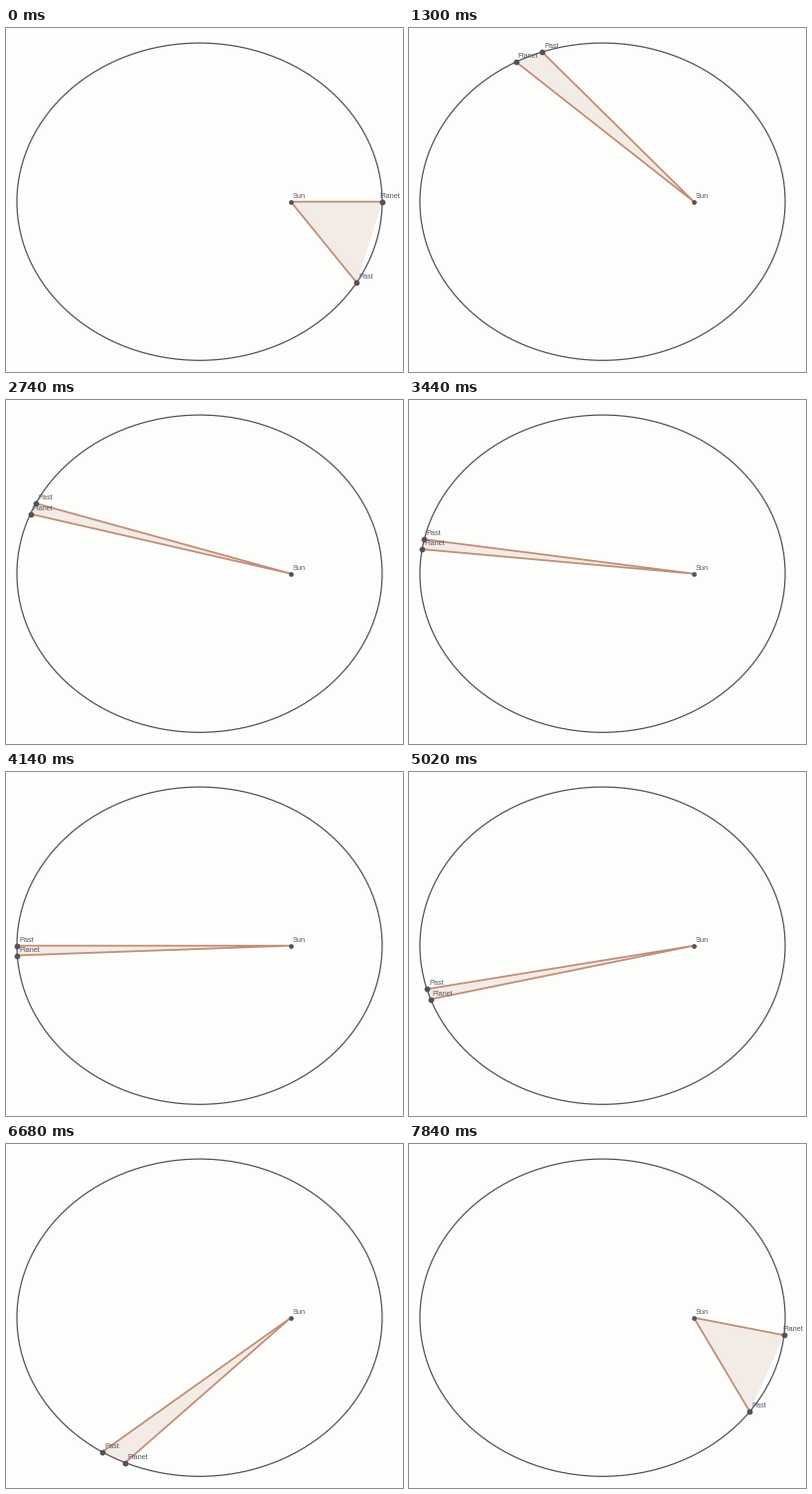
Recreate the animation shown at these times as a matplotlib script. Size 400 px wide and 346 px high, loop 7.86 s.

```python
import numpy as np
import matplotlib.pyplot as plt
from matplotlib.animation import FuncAnimation
from matplotlib.patches import Ellipse, Polygon

W, H, DPI = 400, 346, 100
FRAMES, INTERVAL = 393, 20
PERIOD, LAG = 394, 10            # orbital period and trailing delay, in steps
CX, CY, A, B, ECC = 195, 174.7, 184, 159.6, 0.5
SUN = (CX + A * ECC, CY)
PAPER, INK, TEXT = "#fdfefc", "#55515a", "#585662"
EDGE, FILL = "#c08f79", "#f3ebe5"
LABEL_RIGHT = 376.5              # keeps the longest label on the stage


def px(n):
    return n * 72 / DPI


def orbit(step):
    """Position at a time step, from Kepler's equation."""
    mean = (2 * np.pi * step / PERIOD + np.pi) % (2 * np.pi) - np.pi
    ecc_anom = mean
    for _ in range(12):
        error = ecc_anom - ECC * np.sin(ecc_anom) - mean
        ecc_anom -= error / (1 - ECC * np.cos(ecc_anom))
    k = np.sqrt((1 + ECC) / (1 - ECC))
    angle = 2 * np.arctan2(k * np.sin(ecc_anom / 2), np.cos(ecc_anom / 2))
    return CX + A * np.cos(angle), CY - B * np.sin(angle)


fig = plt.figure(figsize=(W / DPI, H / DPI), dpi=DPI, facecolor=PAPER)
ax = fig.add_axes([0, 0, 1, 1])
ax.set(xlim=(0, W), ylim=(H, 0))
ax.axis("off")


class Marker:
    def __init__(self, name, size):
        self.dot, = ax.plot([], [], "o", ms=px(size), color=INK, mew=0, zorder=5)
        self.label = ax.text(0, 0, name, fontsize=px(7.4), color=TEXT,
                             family="Liberation Sans", va="baseline", zorder=4)

    def move(self, x, y):
        self.dot.set_data([x], [y])
        self.label.set_position((min(x + 2, LABEL_RIGHT)
                                 if self.label.get_text() == "Planet" else x + 2,
                                 y - 3.9))


wedge = Polygon([SUN] * 3, fc=FILL, ec="none", zorder=1)
ax.add_patch(wedge)
ax.add_patch(Ellipse((CX, CY), 2 * A, 2 * B, fc="none", ec=INK,
                     lw=px(1.25), zorder=2))
sides, = ax.plot([], [], color=EDGE, lw=px(1.8), zorder=3,
                 solid_joinstyle="bevel")

sun, planet, past = Marker("Sun", 4.8), Marker("Planet", 5.8), Marker("Past", 5.8)
sun.move(*SUN)


def update(i):
    head, tail = orbit(i), orbit(i - LAG)
    wedge.set_xy([SUN, head, tail])
    sides.set_data(*zip(head, SUN, tail))
    planet.move(*head)
    past.move(*tail)
    return wedge, sides


anim = FuncAnimation(fig, update, frames=FRAMES, interval=INTERVAL,
                     repeat=True, repeat_delay=0)
plt.show()
```
